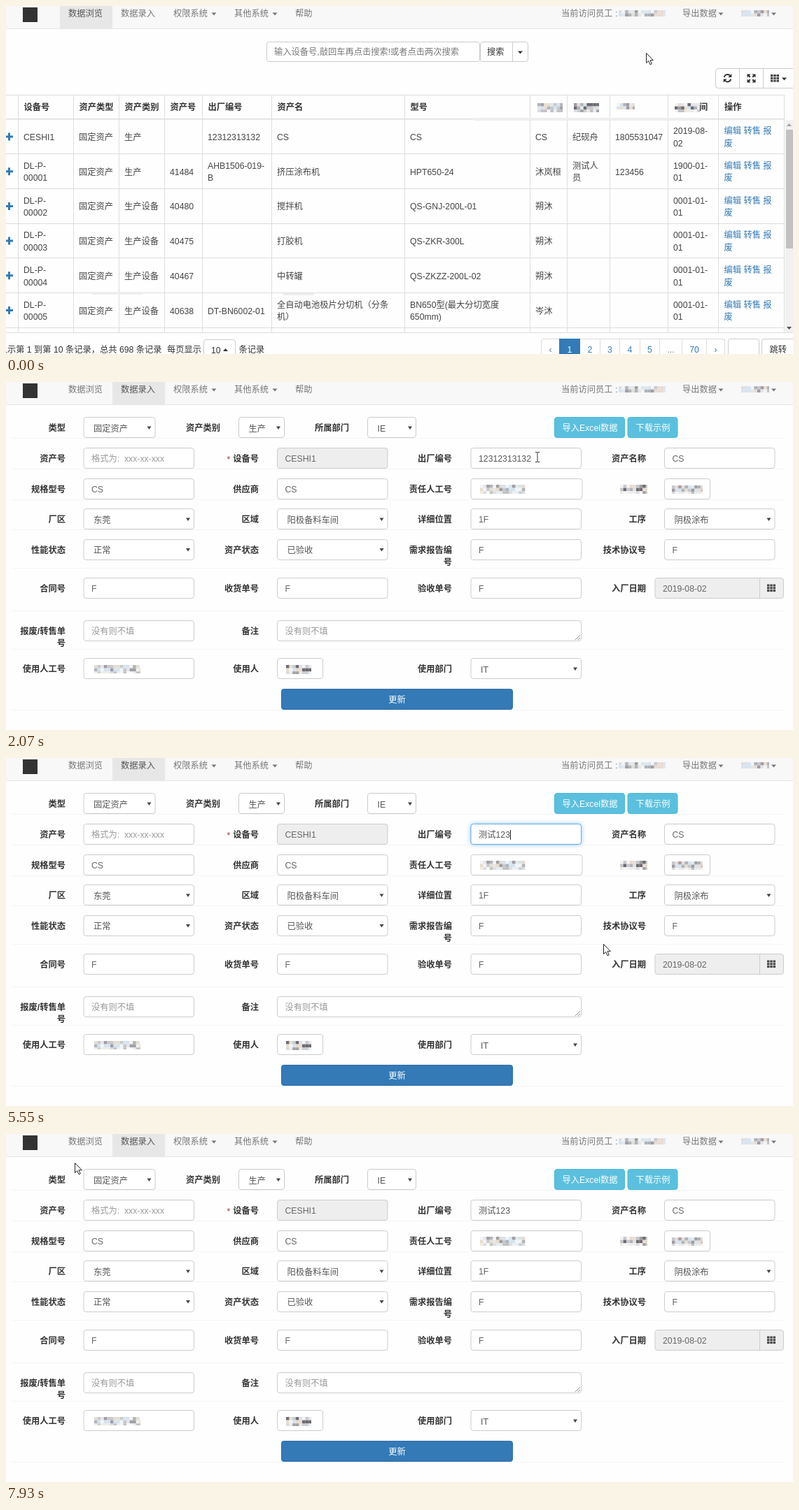
An HTML page that plays this animation: 1124 px wide and 498 px high, repeating every 7990 ms.

```html
<!DOCTYPE html>
<html lang="zh-CN">
<head>
<meta charset="utf-8">
<title>设备管理</title>
<style>
html, body { margin: 0; width: 100%; height: 100%; overflow: hidden; background: #fefefe; }
svg { display: block; font: 12.25px "Liberation Sans", "Noto Sans CJK SC", "Noto Sans CJK", sans-serif; }
text { white-space: pre; }
.b { font-weight: 700; }
#focus { filter: drop-shadow(0 0 3px rgba(102, 175, 233, .7)); }
#toast { filter: drop-shadow(0 0 4px #999); }
</style>
</head>
<body>
<svg id="stage" width="1124" height="498" viewBox="0 0 1124 498"></svg>
<script>
const LOOP = 7990, BLUE = '#337ab7';

// Drawing helpers: every text is placed by its vertical centre.
const text = (x, cy, s, fill = '#555', more = '') =>
  `<text x="${x}" y="${cy + 4.5}" fill="${fill}" ${more}>${s}</text>`;
const bold = (x, cy, s, more = '') => text(x, cy, s, '#333', 'class="b" ' + more);
const rect = (x, y, w, h, fill, more = '') =>
  `<rect x="${x}" y="${y}" width="${w}" height="${h}" fill="${fill}" ${more}/>`;
const box = (x, y, w, h, fill = '#fff', stroke = '#ccc', r = 3.5, more = '') =>
  rect(x + .5, y + .5, w - 1, h - 1, fill, `stroke="${stroke}" rx="${r}" ${more}`);
const path = (d, fill, more = '') => `<path d="${d}" fill="${fill}" ${more}/>`;
const line = (d, stroke, w = 1) => path(d, 'none', `stroke="${stroke}" stroke-width="${w}"`);
const caret = (x, cy, fill = '#777') => path(`M${x} ${cy - 1.5}h7l-3.5 4z`, fill);
const grid = (x, y) => {
  let s = '';
  for (let i = 0; i < 9; i++) s += rect(x + i % 3 * 4.3, y + (i / 3 | 0) * 3.8, 3.4, 3, '#444');
  return s;
};

// Pixelated stand-in for blurred-out text, palest along its top and bottom rows.
function mosaic(x, y, w, h, seed, dark = 0) {
  const tones = ['#c4c7cc', '#e4e5e8', '#a9b0b8', '#e6dccd', '#d3e3f0', '#f4f4f4', '#9a989d'];
  const rand = () => (seed = seed * 16807 % 2147483647) / 2147483647;
  const cell = 4.6;
  rand();
  let s = '';
  for (let j = 0; j < h - 1; j += cell)
    for (let i = 0; i < w - 1; i += cell) {
      const tone = rand() < dark ? '#66646a' : tones[rand() * tones.length | 0];
      const middle = Math.abs(j + cell / 2 - h / 2) < cell;
      s += rect(x + i, y + j, Math.min(cell, w - i), Math.min(cell, h - j), tone, `opacity="${middle ? .95 : .6}"`);
    }
  return s;
}

function navbar(activeX) {
  const items = [[89, '数据浏览'], [164, '数据录入'], [239, '权限系统'], [326, '其他系统'], [413, '帮助'],
    [793, '当前访问员工 :'], [966, '导出数据']];
  return rect(0, 0, 1124, 32, '#f8f8f8') + rect(0, 32, 1124, 1, '#e7e7e7') +
    rect(activeX, 0, 75, 32, '#e7e7e7') + rect(24, 2, 21, 21, '#333') +
    items.map(([x, s]) => text(x, 10.5, s, x - activeX === 12 ? '#555' : '#777')).join('') +
    [293.5, 380.5, 1017.5, 1093].map(x => caret(x, 11)).join('') +
    mosaic(875, 6, 67, 9, 71) + mosaic(1050, 6, 40, 9, 35);
}

function tablePage() {
  const cols = [17, 96, 161, 226, 280, 379, 569, 748, 801, 862, 945, 1017, 1111];
  const heads = ['设备号', '资产类型', '资产类别', '资产号', '出厂编号', '资产名', '型号'];
  const maker = '朔沐', old = '0001-01-|01', fixed = '固定资产', gear = '生产设备';
  const rows = [
    ['CESHI1', fixed, '生产', '', '12312313132', 'CS', 'CS', 'CS', '纪砚舟', '1805531047', '2019-08-|02'],
    ['DL-P-|00001', fixed, '生产', '41484', 'AHB1506-019-|B', '挤压涂布机', 'HPT650-24', '沐岚桓', '测试人|员', '123456', '1900-01-|01'],
    ['DL-P-|00002', fixed, gear, '40480', '', '搅拌机', 'QS-GNJ-200L-01', maker, '', '', old],
    ['DL-P-|00003', fixed, gear, '40475', '', '打胶机', 'QS-ZKR-300L', maker, '', '', old],
    ['DL-P-|00004', fixed, gear, '40467', '', '中转罐', 'QS-ZKZZ-200L-02', maker, '', '', old],
    ['DL-P-|00005', fixed, gear, '40638', 'DT-BN6002-01', '全自动电池极片分切机（分条|机）', 'BN650型(最大分切宽度|650mm)', '岑沐', '', '', old]];
  let s = navbar(77) + rect(0, 162, 1111, 49, '#f5f5f5', 'id="hover"');

  s += box(372, 51, 305, 29) + text(383, 65.5, '输入设备号,敲回车再点击搜索!或者点击两次搜索', '#777');
  s += box(677, 51, 69, 29) + line('M723.5 51v29', '#ccc') + text(687, 65.5, '搜索', '#333') + caret(731, 66, '#333');
  s += box(1013, 89, 120, 29) + line('M1047.5 89v29M1081.5 89v29', '#ccc');
  s += line('M1025.8 102a4.8 4.8 0 0 1 8.6-2M1035.2 104.5a4.8 4.8 0 0 1-8.6 2', '#333', 1.8) +
    path('M1036.3 97v5h-5zM1024.7 109.5v-5h5z', '#333');
  for (const [a, b] of [[-1, -1], [1, -1], [-1, 1], [1, 1]])
    s += `<g transform="translate(1064.5 103.5) scale(${a} ${b})">` +
      path('M6 6h-5l1.7-1.7L1 2.6 2.6 1l1.7 1.7L6 1z', '#333') + '</g>';
  s += grid(1092, 98) + caret(1108, 104, '#333');

  const ys = [127, 211, 261, 311, 360, 410, 460];
  s += ys.map(y => rect(0, y, 1111, 1, '#ddd')).join('') + rect(0, 161, 1111, 1.5, '#ddd') +
    cols.map(x => rect(x, 127, 1, 340, '#ddd')).join('');
  s += rect(668, 160, 327, 4, '#eee') + rect(122, 409, 73, 4, '#eee') + rect(396, 411, 44, 3, '#eee');
  s += heads.map((h, i) => bold(cols[i] + 8.5, 144.5, h)).join('') + bold(1026, 144.5, '操作') + bold(990, 144.5, '间');
  s += mosaic(759, 139, 36, 13, 11) + mosaic(811, 139, 36, 13, 29, .2) +
    mosaic(872, 139, 26, 9, 50, .1) + mosaic(955, 139, 36, 13, 91, .2);

  rows.forEach((row, r) => {
    const cy = 187 + r * 49.7;
    s += path(`M-1 ${cy - 1.5}h4v-4h3v4h4v3h-4v4h-3v-4h-4z`, BLUE);
    row.forEach((cell, i) => {
      const lines = cell.split('|');
      lines.forEach((part, k) => s += text(cols[i] + 8, cy + .5 + (k - (lines.length - 1) / 2) * 17.5, part, '#444'));
    });
    s += text(1025.5, cy - 8.3, '编辑 转售 报', BLUE) + text(1025.5, cy + 9.2, '废', BLUE);
  });
  s += '<g id="linkHover">' + text(1025.5, 178.7, '编辑', '#23527c') + rect(1025.5, 185, 24.5, 1, '#23527c') + '</g>';

  s += rect(1113, 163, 11, 304, '#f1f1f1') + rect(1114, 177, 10, 170, '#c1c1c1') +
    path('M1115 172h7l-3.5-4z', '#a3a3a3') + path('M1115 459h7l-3.5 4z', '#505050') + rect(0, 467, 1124, 1, '#ddd');
  s += rect(0, 468, 1124, 30, '#fefefe');
  s += text(222.5, 491.5, '显示第 1 到第 10 条记录，总共 698 条记录', '#333', 'text-anchor="end"') +
    text(230, 491.5, '每页显示', '#333') + box(282, 477, 46, 30) + text(293, 492, '10', '#333') +
    path('M310 494h7l-3.5-4z', '#333') + text(332.5, 491.5, '条记录', '#333');

  const edges = [764, 790, 819, 848, 876, 905, 933, 965, 1000, 1026];
  s += box(764, 476, 263, 30, '#fff', '#ddd');
  ['‹', '1', '2', '3', '4', '5', '...', '70', '›'].forEach((label, i) => {
    const on = i === 1, x = edges[i], w = edges[i + 1] - x;
    s += on ? rect(x, 476, w + 1, 22, BLUE) : rect(x + w, 476, 1, 22, '#ddd');
    s += text(x + w / 2 + .5, 491.5, label, on ? '#fff' : i === 6 ? '#777' : BLUE, 'text-anchor="middle"');
  });
  return s + box(1031, 476, 45, 30) + box(1079, 476, 60, 30) + text(1090.5, 491.5, '跳转', '#333');
}

function formPage() {
  const X = [110.5, 387, 663.5, 940], R = [85, 361, 637, 914];
  const Y = [65, 109, 152.5, 196, 239.5, 294.5, 355.5, 410];
  let s = navbar(152);
  const label = (c, r, name) => name.split('|').forEach((part, k) =>
    s += bold(R[c], Y[r] + .5 + k * 17.5, part, 'text-anchor="end"'));
  const field = (x, r, value = '', w = 158.5, fill = '#fff', color = '#666') =>
    s += box(x, Math.floor(Y[r] - 14.5), w, 30, fill) + text(x + 11.5, Y[r] + .5, value, color);
  const select = (x, r, value, w = 158.5, more = '') => {
    field(x, r, '', w);
    s += text(x + 14.5, Y[r] + 1, value, '#555', more) + path(`M${x + w - 12} ${Y[r] - 1.5}h6l-3 4.5z`, '#444');
  };
  const late = 'class="late"', hint = '#999';

  for (const y of [80, 124, 168, 211, 266, 327, 382, 469]) s += rect(8, y, 1103, 1, '#f4f4f4');

  label(0, 0, '类型');
  s += bold(257, 65.5, '资产类别') + bold(441, 65.5, '所属部门');
  select(110.5, 0, '固定资产', 103); select(332, 0, '生产', 66); select(516, 0, 'IE', 70);
  s += box(783, 50, 101, 30, '#5bc0de', '#46b8da') + text(794.5, 65.5, '导入Excel数据', '#fff') +
    box(887.5, 50, 72, 30, '#5bc0de', '#46b8da') + text(899.5, 65.5, '下载示例', '#fff');

  [['资产号', '设备号', '出厂编号', '资产名称'], ['规格型号', '供应商', '责任人工号'],
   ['厂区', '区域', '详细位置', '工序'], ['性能状态', '资产状态', '需求报告编|号', '技术协议号'],
   ['合同号', '收货单号', '验收单号', '入厂日期'], ['报废/转售单|号', '备注'], ['使用人工号', '使用人', '使用部门']]
    .forEach((names, r) => names.forEach((name, c) => label(c, r + 1, name)));
  s += text(315.5, 110, '*', '#a33');

  field(X[0], 1, '格式为:  xxx-xx-xxx', 158.5, '#fff', hint);
  field(X[1], 1, 'CESHI1', 158.5, '#eee');
  field(X[2], 1);
  s += box(X[2], 94, 158.5, 30, '#fff', '#66afe9', 3.5, 'id="focus"') +
    rect(675, 101, 0, 16, '#3297fd', 'id="selection"') + text(675, 109.5, '', '#555', 'id="value"') +
    rect(0, 103, 1, 14, '#222', 'id="caret"');
  field(X[3], 1, 'CS');

  field(X[0], 2, 'CS'); field(X[1], 2, 'CS'); field(X[2], 2, '', 160); field(X[3], 2, '', 66);
  s += mosaic(677, 147, 65, 13, 83) + mosaic(877, 147, 39, 13, 17, .2) + mosaic(951, 148, 44, 12, 61);

  select(X[0], 3, '东莞', 158.5, late); select(X[1], 3, '阳极备料车间', 158.5, late);
  field(X[2], 3, '1F'); select(X[3], 3, '阴极涂布', 158.5, late);
  select(X[0], 4, '正常'); select(X[1], 4, '已验收'); field(X[2], 4, 'F'); field(X[3], 4, 'F');
  for (let c = 0; c < 3; c++) field(X[c], 5, 'F');
  field(926.5, 5, '2019-08-02', 184.5, '#eee');
  s += line('M1076.5 280v30', '#ccc') + grid(1087, 289.5);

  field(X[0], 6, '没有则不填', 158.5, '#fff', hint); field(X[1], 6, '没有则不填', 435, '#fff', hint);
  s += line('M813 369l7-7M817 369l3-3', '#888');
  field(X[0], 7); field(X[1], 7, '', 66); select(X[2], 7, 'IT', 158.5, 'id="dept"');
  s += mosaic(126, 405, 66, 12, 47) + mosaic(400, 405, 36, 13, 23, .12);

  s += box(392, 438, 333, 32, 'none', '#8fb4e3', 4, 'id="ring"') +
    box(393, 439, 331, 30, BLUE, '#2e6da4', 3, 'id="submit"') + text(558.5, 454, '更新', '#fff', 'text-anchor="middle"');
  return s + '<g id="toast">' + rect(428, -20, 261, 51.5, '#51a351', 'rx="3"') +
    line('M442 10l6 6.5 12-13', '#fff', 4) + text(471, 10, '更新成功,即将刷新', '#fff') + '</g>';
}

const ink = 'stroke="#222" stroke-width="1" stroke-linejoin="round"';
const cursors = {
  arrow: path('M.5 .5v14l3.2-3 2.3 5.3 2.3-1-2.3-5.1h4.4z', '#fff', ink),
  hand: path('M-.5 1.5c0-2 3-2 3 0v6c.5-1.2 2.7-1 2.8.3.6-1 2.6-.6 2.7.6.7-.7 2.5-.2 2.5 1.2v4.4l-1.8 3.5v2.5h-8v-2.5l-4.7-6c-1-1.8 1-2.8 2-1.8l1.5 1.5z', '#fff', ink),
  beam: line('M-3 -6.5h2.3l.7 .7 .7-.7H3M0 -6v13M-3 7.5h2.3l.7-.7 .7.7H3', '#333')
};

document.getElementById('stage').innerHTML =
  `<g id="table">${tablePage()}</g><g id="form">${formPage()}</g>` +
  '<g id="pointer"><circle id="press" r="10.5" fill="#8ca23a"/>' +
  Object.entries(cursors).map(([id, art]) => `<g id="${id}">${art}</g>`).join('') + '</g>';

const $ = id => document.getElementById(id);
const show = (el, on) => el.setAttribute('visibility', on ? 'inherit' : 'hidden');
const within = (t, a, b) => t >= a && t < b;

// Pointer moves: first step, last step, step count, destination.
const moves = [
  [370, 910, 8, 1036, 176], [1600, 2070, 7, 759, 107], [2620, 2850, 4, 604, 105],
  [5230, 5550, 5, 853, 266], [6090, 6090, 1, 631, 455], [7630, 7630, 1, 98, 45], [7930, 7930, 1, 98, 41]];

function pointerAt(t) {
  let x = 914, y = 67;
  for (const [from, to, n, tx, ty] of moves) {
    if (t < from) break;
    const p = n === 1 ? 1 : Math.min(1, (Math.floor((t - from) / (to - from) * (n - 1) + 1e-6) + 1) / n);
    const e = p * p * (3 - 2 * p);
    x += (tx - x) * e;
    y += (ty - y) * e;
  }
  return [x, y];
}

function typed(t) {
  if (t < 3930) return '12312313132';
  return '测试' + '123'.slice(0, t < 4310 ? 0 : Math.min(3, Math.floor((t - 4310) / 75) + 1));
}

function render(t) {
  const [x, y] = pointerAt(t), editing = t >= 1450, reload = 7180;
  show($('table'), !editing);
  show($('form'), editing);
  show($('hover'), !editing && y > 162);
  show($('linkHover'), !editing && y > 172);

  const hand = !editing && y > 172 || within(t, 6090, 6850);
  const beam = within(t, 1900, 2860) && x > 664 && x < 822;
  show($('hand'), hand);
  show($('beam'), beam);
  show($('arrow'), !hand && !beam);
  show($('press'), within(t, 1290, 1450) || within(t, 2620, 2850) || within(t, 6640, 6760));
  $('pointer').setAttribute('transform', `translate(${x} ${y})`);

  const value = $('value'), s = typed(t);
  if (value.textContent !== s) value.textContent = s;
  const end = 675 + value.getComputedTextLength();
  const selecting = within(t, 2620, 3930), start = Math.min(end, Math.max(675, x));
  $('selection').setAttribute('x', start);
  $('selection').setAttribute('width', selecting ? end - start : 0);
  value.setAttribute('fill', selecting && start < 680 ? '#fff' : '#555');
  $('caret').setAttribute('x', Math.round(end));
  show($('caret'), within(t, 3930, 5010) || within(t, 5390, 5700) || within(t, 5930, 6310));
  show($('focus'), within(t, 2620, 6720));

  const submit = $('submit'), over = within(t, 6090, reload);
  submit.setAttribute('fill', within(t, 6640, 6760) ? '#204d74' : over ? '#286090' : BLUE);
  submit.setAttribute('stroke', over ? '#204d74' : '#2e6da4');
  show($('ring'), within(t, 6640, reload));

  const fade = Math.max(0, Math.min(1, (t - 6760) / 280));
  $('toast').setAttribute('opacity', t < reload ? .8 * fade : 0);
  document.querySelectorAll('.late').forEach(el => show(el, !within(t, reload, 7330)));
  $('dept').textContent = within(t, reload, 7490) ? 'IE' : 'IT';
}

function tick() {
  render(performance.now() % LOOP);
  requestAnimationFrame(tick);
}
tick();
</script>
</body>
</html>
```
